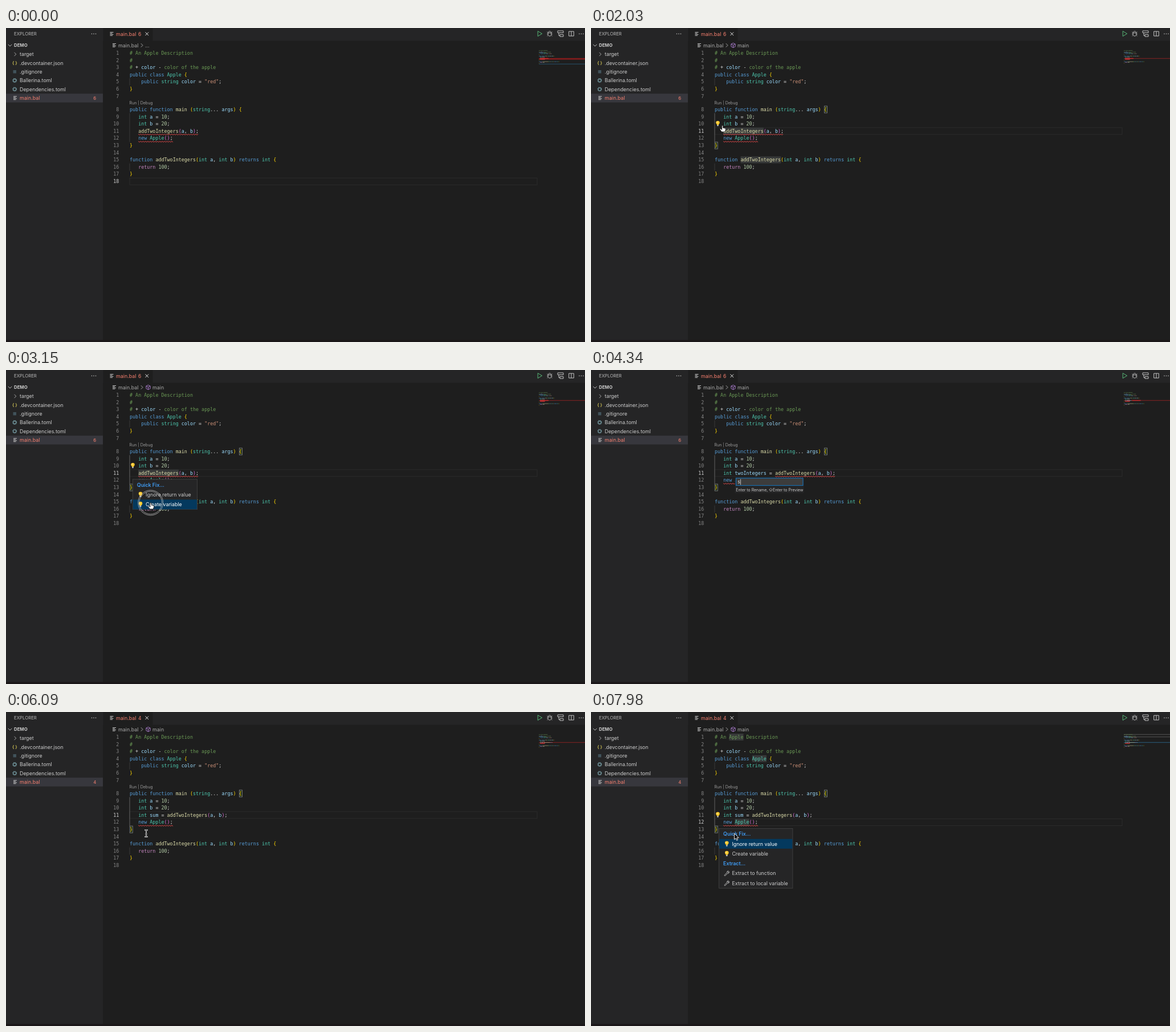
Animation of 1016x551 px, one loop 8000 ms. Source, as an HTML page:

```html
<!DOCTYPE html>
<html lang="en">
<head>
<meta charset="utf-8">
<title>Editor code actions</title>
<style>
html, body { margin: 0; width: 100%; height: 100%; overflow: hidden; background: #1e1e1e; }
svg { display: block; width: 100vw; height: 100vh; }
text { white-space: pre; }
.ui { font: 8.9px Inter, "Open Sans", sans-serif; }
.code { font: 8.4px "DejaVu Sans Mono", "Liberation Mono", monospace; }
</style>
</head>
<body>
<svg viewBox="0 0 1016 551" xmlns="http://www.w3.org/2000/svg">
  <g id="frame"></g>
  <g id="live"></g>
</svg>
<script>
const LOOP = 8000, STEP = 70;
const CHAR = 5.057, LEFT = 217, PITCH = 12.62;
const ERROR = '#f88070';
const COLORS = {
  c: '#6a9955', k: '#569cd6', t: '#4ec9b0', f: '#dcdcaa', v: '#9cdcfe',
  s: '#ce9178', n: '#b5cea8', d: '#d4d4d4', g: '#ffd700', p: '#da70d6', r: '#c586c0'
};

// "~x" switches to colour x.
const CALL = '~faddTwoIntegers~p(~va~d, ~vb~p)~d;';
const CODE = [
  '~c# An Apple Description',
  '~c#',
  '~c# ~d+ ~vcolor ~d- ~ccolor of the apple',
  '~kpublic class ~tApple ~g{',
  '    ~kpublic ~tstring ~vcolor ~d= ~s"red"~d;',
  '~g}',
  '',
  '~kpublic function ~fmain ~g(~tstring~d... ~vargs~g) {',
  '   ~tint ~va ~d= ~n10~d;',
  '   ~tint ~vb ~d= ~n20~d;',
  '',
  '   ~knew ~tApple~p()~d;',
  '~g}',
  '',
  '~kfunction ~faddTwoIntegers~g(~tint ~va~d, ~tint ~vb~g) ~kreturns ~tint ~g{',
  '   ~rreturn ~n100~d;',
  '~g}',
  ''
];
const CALL_LINES = ['   ' + CALL, '   ~tint ~vtwoIntegers ~d= ' + CALL, '   ~tint ~vsum ~d= ' + CALL];

// Pointer path: time, x, y
const PATH = [
  [70, 400, 490], [280, 312, 288], [420, 312, 288], [770, 273, 184.5], [840, 273, 184.5],
  [910, 269, 184.5], [980, 269, 184.5], [1050, 263.5, 179], [1540, 263.5, 179], [2100, 226, 170],
  [2520, 226, 170], [2590, 231, 178], [2660, 242, 192], [3150, 254, 233], [3220, 254, 233],
  [3290, 254, 238], [5670, 254, 238], [5950, 245, 238], [6020, 245, 238], [6090, 246, 213],
  [6230, 268, 194], [6860, 268, 194], [7350, 226, 183], [7840, 226, 183],
  [7910, 237, 197], [7980, 251.5, 213]
];

const lineY = n => n < 8 ? 44 + PITCH * (n - 1) : 143 + PITCH * (n - 8);
const colX = c => LEFT + c * CHAR;
const within = (t, a, b) => t >= a && t < b;

const rect = (x, y, w, h, fill, more = '') =>
  `<rect x="${x}" y="${y}" width="${w}" height="${h}" fill="${fill}" ${more}/>`;
const path = (d, color, w = 1, fill = 'none') =>
  `<path d="${d}" stroke="${color}" stroke-width="${w}" fill="${fill}" stroke-linejoin="round"/>`;
const circle = (x, y, r, fill, more = '') => `<circle cx="${x}" cy="${y}" r="${r}" fill="${fill}" ${more}/>`;
const at = (x, y, body) => `<g transform="translate(${x} ${y})">${body}</g>`;
const label = (x, y, s, fill = '#ccc', size = 8.9, weight = 400) =>
  `<text class="ui" x="${x}" y="${y + size * .36}" fill="${fill}" style="font-size:${size}px;font-weight:${weight}">${s}</text>`;
const mono = (x, y, s, fill, more = '') =>
  `<text class="code" x="${x}" y="${y + 2.9}" fill="${fill}" ${more}>${s}</text>`;

function tokens(src) {
  let col = 0;
  return src.split('~').map((part, i) => {
    const text = i ? part.slice(1) : part;
    const tok = { text, col, color: COLORS[i ? part[0] : 'd'] };
    col += text.length;
    return tok;
  }).filter(tok => tok.text);
}

function codeLine(src, n) {
  const spans = tokens(src).map(k => `<tspan fill="${k.color}">${k.text}</tspan>`).join('');
  return mono(LEFT, lineY(n), spans, '#d4d4d4');
}

function mapLine(src, n) {
  return tokens(src).map(k => [...k.text.matchAll(/\S+/g)].map(m =>
    rect(935 + (k.col + m.index) * .7, mapY(n), m[0].length * .7, .9, k.color, 'opacity=".55"')).join('')).join('');
}
const mapY = n => 39 + 1.4 * (n - 1);

// Icons, each centred on 0,0
const dots = [-3.5, 0, 3.5].map(x => circle(x, 0, .8, '#c5c5c5')).join('');
const fileIcon = path('M-3 -2.8H3M-3 -.9H1M-3 1H3M-3 2.9H1.5', '#c5c5c5', 1);
const chevron = path('M-1.5 -3.2L1.7 0L-1.5 3.2', '#b5b5b5', .9);
const gear = circle(0, 0, 2.5, 'none', 'stroke="#6d8f96" stroke-width="1.3"') +
  circle(0, 0, 3.5, 'none', 'stroke="#6d8f96" stroke-width="1.1" stroke-dasharray="1.4 1.35"');
const cube = path('M0 -4L3.6 -2.2V2.2L0 4L-3.6 2.2V-2.2ZM-3.6 -2.2L0 -.3L3.6 -2.2M0 -.3V4', '#b180d7', .9);
const bulb = path('M-1.5 2.2C-1.5 .8 -3.3 .4 -3.3 -1.7A3.3 3.1 0 0 1 3.3 -1.7C3.3 .4 1.5 .8 1.5 2.2Z', 'none', 0, '#ffcb2f') +
  circle(-.9, -2.2, 1, '#ffe994') + rect(-1.4, 2.2, 2.8, 2.3, '#b9bcc0', 'rx=".7"');
const wrench = path('M-4 2.8L.4 -1.4C-.2 -3 1.3 -4.6 3 -4.1L1.5 -2.5L2.6 -1.4L4.2 -2.9C4.7 -1.1 3 .4 1.5 -.2L-2.8 4.1C-3.8 4.6 -4.6 3.8 -4 2.8Z', '#c5c5c5', .9);
const bug = path('M-2.8 -1.6C-2.8 -5 2.8 -5 2.8 -1.6V1.5C2.8 5 -2.8 5 -2.8 1.5ZM-2.8 -1.5H2.8M-4.6 -3L-2.8 -1.5M4.6 -3L2.8 -1.5M-4.8 .6H-2.8M4.8 .6H2.8M-4.4 4L-2.6 2.4M4.4 4L2.6 2.4', '#c5c5c5', .9);
const diagram = path('M-5 -5H5V-1.6H-5ZM-1 1.6H5V5H-1ZM-3 -1.6V3.3H-1', '#c5c5c5', 1);
const split = path('M-4.3 -4H4.3V4H-4.3ZM0 -4V4', '#c5c5c5', 1);
const shift = path('M0 -2.7L2.8 .2H1.3V2.4H-1.3V.2H-2.8Z', '#ccc', .6);

// Pointers, each with its hot spot on 0,0
const POINTERS = {
  arrow: path('M0 0V10.8L2.5 8.5L4.2 12.3L6 11.5L4.3 7.8H7.7Z', '#fff', .9, '#000'),
  hand: path('M-1 1C-1 -.6 1 -.6 1 1V4L5 5C6 5.4 5.8 7 5 9L4.4 11H-1.4L-4.4 7C-5 5.8 -3.8 5 -2.8 5.9L-1 7.4Z', '#111', .8, '#fff'),
  beam: ['#fff', '#222'].map((c, i) =>
    path('M-3 -6C-1.2 -6 0 -5.6 0 -4.3C0 -5.6 1.2 -6 3 -6M0 -4.6V4.6M-3 6C-1.2 6 0 5.6 0 4.3C0 5.6 1.2 6 3 6M-1.5 1H1.5', c, i ? .8 : 2)).join('')
};

function squiggle(col, len, n) {
  const x = colX(col), y = lineY(n) + 5.3;
  let d = `M${x} ${y}`;
  for (let i = 1; i * 2.1 <= len * CHAR + .5; i++) d += `L${x + i * 2.1} ${y + (i % 2 ? 1.5 : 0)}`;
  return path(d, '#f14c4c', .9);
}

function menu(x, y, w, items, selected) {
  const h = 9.5 + 17.3 * (items.length - 1) + 8.7;
  const rows = items.map((item, i) => {
    const cy = y + 9.5 + 17.3 * i;
    if (!item.icon) return label(x + 7.5, cy, item.text, '#3f9cf5', 8.9, 600);
    return (i === selected ? rect(x + .5, cy - 8.5, w - 1, 17, '#04395e') : '') +
      at(x + 13.7, cy, item.icon) + label(x + 22.8, cy, item.text, i === selected ? '#fff' : '#ccc');
  });
  return rect(x, y, w, h, '#252526', 'stroke="#454545" stroke-width=".8"') + rows.join('');
}
const FIXES = [{ text: 'Quick Fix...' }, { text: 'Ignore return value', icon: bulb }, { text: 'Create variable', icon: bulb }];
const EXTRACTS = [{ text: 'Extract...' }, { text: 'Extract to function', icon: wrench }, { text: 'Extract to local variable', icon: wrench }];

function renameBox(t) {
  const text = t < 4340 ? 'twoIntegers' : t < 4480 ? 's' : t < 4900 ? 'su' : 'sum';
  const selected = t < 4340 ? rect(257, 191.5, text.length * CHAR, 10.5, '#264f78') : '';
  return rect(252.5, 188.5, 121, 27.5, '#252526') +
    rect(254.5, 189.7, 117.5, 13, '#3c3c3c', 'stroke="#0e7fd4" stroke-width=".9"') + selected +
    mono(257, 196.4, text, '#ddd') + rect(257 + text.length * CHAR, 191.5, .8, 10, '#ddd') +
    label(254.3, 210, 'Enter to Rename, ', '#ccc', 6.95) + at(315.5, 210, shift) +
    label(319, 210, 'Enter to Preview', '#ccc', 6.95);
}

function pointer(t) {
  if (t < 70 || within(t, 4340, 5460)) return '';
  const i = Math.max(1, PATH.findIndex(p => p[0] >= t));
  const [t0, x0, y0] = PATH[i - 1], [t1, x1, y1] = PATH[i];
  const k = (t - t0) / (t1 - t0);
  const x = x0 + (x1 - x0) * k, y = y0 + (y1 - y0) * k;
  const kind = within(t, 2030, 2590) || within(t, 2870, 3290) || within(t, 7280, 7910) ? 'hand'
    : within(t, 2590, 2870) || t >= 7910 ? 'arrow' : 'beam';
  return at(x, y, POINTERS[kind]);
}

const ring = (x, y) => [22, 20].map(r => circle(x, y, r, 'none', 'stroke="#c8c8c8" stroke-width=".9" opacity=".8"')).join('');

function buildFrame() {
  const files = [
    ['target', at(16, 46, chevron)],
    ['.devcontainer.json', label(11, 61.3, '{ }', '#d5c757', 7.6, 600)],
    ['.gitignore', rect(12.5, 74, 5.5, 5.5, '#41535b')],
    ['Ballerina.toml', at(15.2, 92, gear)],
    ['Dependencies.toml', at(15.2, 107.4, gear)],
    ['main.bal', at(16, 122.8, fileIcon)]
  ];
  return rect(0, 0, 1016, 22.5, '#252526') + rect(0, 0, 170, 551, '#252526') +
    rect(170.5, 0, 87, 22.5, '#1e1e1e') + rect(0, 115.2, 170, 15.4, '#37373d') +
    rect(0, 547.5, 1016, 3.5, '#1b1719') +
    label(14, 10.3, 'EXPLORER', '#bbb', 7.8) + at(154, 10.3, dots) +
    at(7, 30.3, path('M-3.2 -1.5L0 1.7L3.2 -1.5', '#ccc', .9)) + label(14, 30.3, 'DEMO', '#ccc', 7.8, 700) +
    files.map(([name, icon], i) => icon + label(24, 46 + 15.4 * i, name, i === 5 ? ERROR : '#ccc')).join('') +
    at(185.5, 10.3, fileIcon) + label(193, 10.5, 'main.bal', ERROR) +
    at(247.3, 10.3, path('M-2.8 -2.8L2.8 2.8M2.8 -2.8L-2.8 2.8', '#e8e8e8', 1)) +
    at(936, 10, path('M-2.8 -4.5L4.6 0L-2.8 4.5Z', '#58b878', 1)) +
    at(954, 10, bug) + at(973, 10, diagram) + at(992, 10, split) + at(1009.5, 10.3, dots) +
    at(190, 30.3, fileIcon) + label(197, 30.4, 'main.bal', '#a9a9a9') + at(238.3, 30.4, chevron) +
    label(216.5, 131.2, 'Run | Debug', '#999', 7.05);
}

function miniMap(t, lines, active) {
  const bar = (n, fill, h = 1.3) => rect(935, mapY(n) - .2, 81, h, fill);
  const blob = (n, col, len) => rect(935 + col * .7, mapY(n) - .3, len * .7, 1.5, '#c42b2b');
  let out = active === 18 ? bar(18, '#24465a') + bar(11, '#841c1c', 2.7) : active === 11 ? bar(11, '#702222') : bar(11, '#27506a');
  if (t >= 6720) out += bar(1, '#484848') + bar(4, '#484848');
  out += lines.map((s, i) => mapLine(s, i + 1)).join('');
  if (t < 4620) out += t < 3360 ? blob(11, 3, 21) : blob(11, 21, 21);
  return out + blob(12, 3, 12);
}

function buildLive(t) {
  const edit = t < 3360 ? 0 : t < 5390 ? 1 : 2;
  const lines = CODE.slice();
  lines[10] = CALL_LINES[edit];
  const active = t < 1050 ? 18 : t < 6440 ? 11 : 12;
  const inMain = t >= 1120;
  const errors = t < 4620 ? 6 : 4;
  const mark = (n, col, len) => rect(colX(col), lineY(n) - 6, len * CHAR, 12, '#373939');
  const brace = (n, col) => rect(colX(col) + .2, lineY(n) - 6, CHAR, 12, '#1c2a1c', 'stroke="#888" stroke-width=".8"');
  const guide = (a, b, color) => rect(LEFT - .4, lineY(a) - 6.3, .8, lineY(b) - lineY(a) + 12.6, color);
  let out = label(153.3, 123, errors, ERROR, 8) + label(232, 10.5, errors, ERROR, 8.6);

  out += t < 1260 ? label(244, 30.4, '...', '#a9a9a9') : at(249.5, 30.4, cube) + label(257, 30.4, 'main', '#a9a9a9');
  out += rect(LEFT, lineY(active) - 6, 715, 12, 'none', 'stroke="#2b2b2b" stroke-width="1"');
  out += guide(5, 5, '#404040') + guide(9, 12, inMain ? '#707070' : '#404040') + guide(16, 16, '#404040');

  if (within(t, 1330, 3360)) out += mark(11, 3, 14) + mark(15, 9, 14);
  if (t >= 6720) out += mark(1, 5, 5) + mark(4, 13, 5) + mark(12, 7, 5);
  if (inMain) out += brace(8, 38) + brace(13, 0);

  lines.forEach((src, i) => {
    const n = i + 1;
    out += mono(198.3, lineY(n), n, n === active ? '#d0d0d0' : '#858585', 'text-anchor="end"') + codeLine(src, n);
  });
  if (t < 4620) out += squiggle(edit ? 21 : 3, 21, 11);
  out += squiggle(3, 12, 12);
  if (within(t, 1050, 1540)) out += rect(colX(9), lineY(11) - 5.5, .9, 11, '#aeafad');

  out += miniMap(t, lines, active);
  if (within(t, 1610, 3290)) out += at(222.5, lineY(10) - .5, bulb);
  if (t >= 6930) out += at(222.5, lineY(11) - .5, bulb);
  if (within(t, 2310, 3290)) out += menu(222.3, 191.8, 113.3, FIXES, t < 3080 ? 1 : 2);
  if (within(t, 3570, 5390)) out += renameBox(t);
  if (t >= 7560) out += menu(224.6, 204.5, 129.3, FIXES.concat(EXTRACTS), 1);

  out += pointer(t);
  if (within(t, 2240, 2380)) out += ring(226, 170);
  if (within(t, 3150, 3290)) out += ring(253.7, 233);
  if (within(t, 7420, 7560)) out += ring(226, 183);
  return out;
}

const live = document.getElementById('live');
document.getElementById('frame').innerHTML = buildFrame();
const start = performance.now();
let shown = -1;

function tick(now) {
  const t = Math.floor(Math.max(0, now - start) % LOOP / STEP) * STEP;
  if (t !== shown) live.innerHTML = buildLive(shown = t);
  requestAnimationFrame(tick);
}
tick(start);
</script>
</body>
</html>
```
